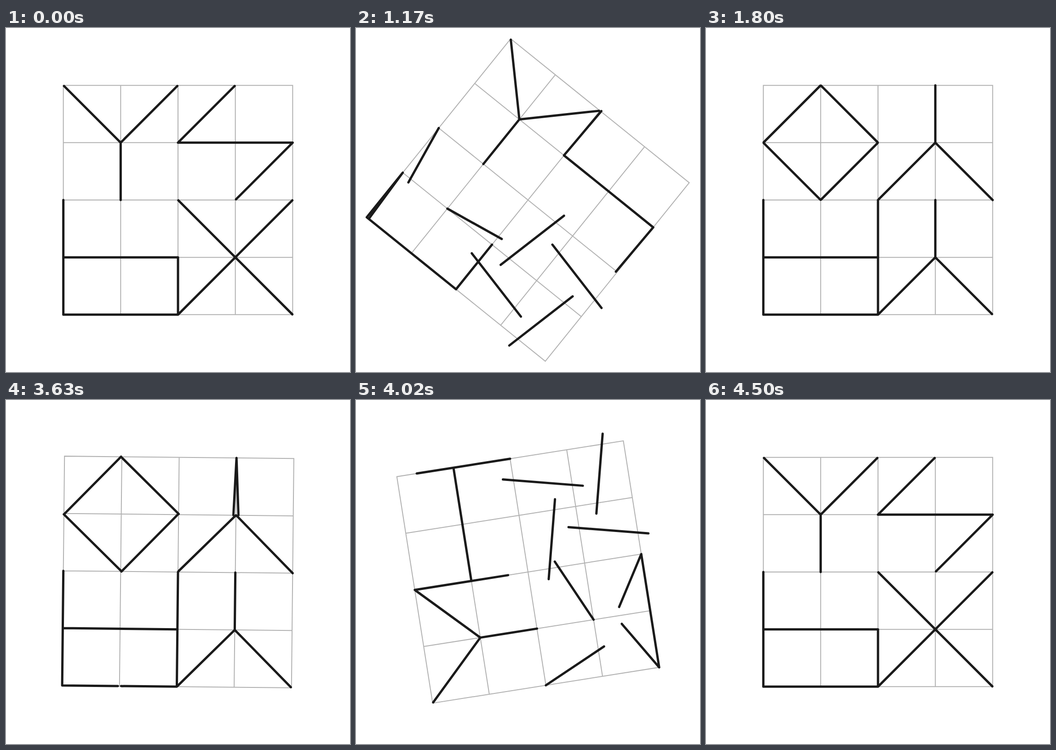
Animation of 748 by 748 pixels, one loop 5400 ms. Source, as an HTML page:

```html
<!DOCTYPE html>
<html lang="en">
<head>
<meta charset="utf-8">
<title>Turning grid</title>
<style>
  html, body { margin: 0; width: 100%; height: 100%; overflow: hidden; background: #fff; }
  svg { display: block; width: 100%; height: 100%; }
  path { fill: none; }
  #grid { stroke: #b2b2b2; stroke-width: 2; }
  #ink { stroke: #1a1a1a; stroke-width: 5; stroke-linecap: round; stroke-linejoin: round; }
</style>
</head>
<body>
<svg viewBox="0 0 748 748">
  <g id="board">
    <path id="grid"/>
    <path id="ink"/>
  </g>
</svg>
<script>
const LOOP = 5400, TURN = 900, STEP = 30;
const CELL = 748 / 6;
const DIAG = 1.398; // drawn length of a cell diagonal

const board = document.getElementById('board');
const ink = document.getElementById('ink');

const clamp = v => Math.min(1, Math.max(0, v));
const smooth = v => v * v * (3 - 2 * v);
const mix = (a, b, k) => a + (b - a) * k;
const px = v => ((v + 1) * CELL).toFixed(2);

// A stroke from a pivot, in cell units and degrees
function rod(x, y, deg, len) {
  if (len <= 0) return '';
  const a = deg * Math.PI / 180;
  return `M${px(x)} ${px(y)}L${px(x + len * Math.cos(a))} ${px(y + len * Math.sin(a))}`;
}

// A diagonal stroke spinning around its middle
function spinner(x, y, deg) {
  const a = deg * Math.PI / 180, h = DIAG / 2;
  return rod(x - h * Math.cos(a), y - h * Math.sin(a), deg, DIAG);
}

function drawGrid() {
  let d = `M${px(0)} ${px(0)}H${px(4)}V${px(4)}H${px(0)}Z`;
  for (let i = 1; i < 4; i++) {
    d += `M${px(i)} ${px(0)}V${px(4)}M${px(0)} ${px(i)}H${px(4)}`;
  }
  document.getElementById('grid').setAttribute('d', d);
}

// m runs from 0 (first layout) to 1 (second layout)
function strokes(m) {
  const whole = smooth(m);
  const [a, b, c] = [0, 1, 2].map(i => smooth(clamp(3 * m - i)));
  const grown = mix(1, DIAG, whole);
  const shrunk = mix(DIAG, 1, a);
  const spin = 270 * whole;

  const parts = [
    // top left: unchanged
    rod(1, 1, -135, DIAG), rod(1, 1, -45, DIAG), rod(1, 1, 90, 1),

    // top right: diagonals straighten, sides extend, top closes
    rod(2, 1, 0, 2),
    rod(2, 1, mix(-45, -90, a), shrunk), rod(4, 1, mix(135, 90, a), shrunk),
    rod(2, 1, 90, b), rod(4, 1, -90, b),
    rod(2, 0, 0, c), rod(4, 0, 180, c),

    // bottom left: arms swing, the box folds into a stem
    rod(0, 2, mix(90, 45, whole), grown),
    rod(1, 3, mix(0, -45, whole), grown),
    rod(1, 4, mix(180, 270, c), 1), rod(1, 4, mix(0, -90, c), 1),

    // bottom right: cross to diamond
    spinner(2.5, 2.5, 45 + spin), spinner(3.5, 3.5, 45 + spin),
    spinner(3.5, 2.5, spin - 45), spinner(2.5, 3.5, spin - 45)
  ];
  if (b === 0) parts.push(rod(0, 3, mix(0, 90, a), 1));
  if (c === 0) parts.push(rod(0, 4, mix(-90, 0, b), 1), rod(2, 4, mix(-90, -180, b), 1));
  return parts.join('');
}

function render(ms) {
  const t = Math.floor((ms % LOOP) / STEP) * STEP;
  const out = clamp((t - 900) / TURN);
  const back = clamp((t - 3600) / TURN);
  const deg = 180 * (smooth(out) + smooth(back));
  ink.setAttribute('d', strokes(back > 0 ? 1 - back : out));
  board.setAttribute('transform', `rotate(${deg.toFixed(3)} 374 374)`);
}

drawGrid();
render(0);
const start = performance.now();
(function tick() {
  render(performance.now() - start);
  requestAnimationFrame(tick);
})();
</script>
</body>
</html>
```
